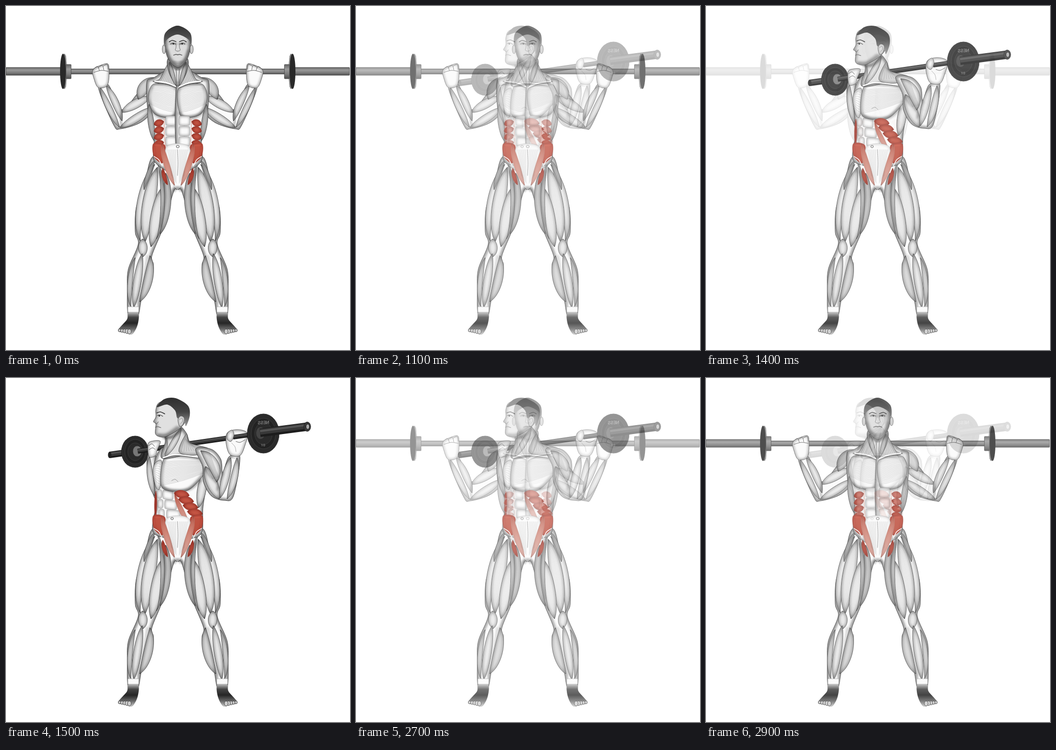
An HTML page that plays this animation: 700 px wide and 700 px high, repeating every 3000 ms.

```html
<!DOCTYPE html>
<html lang="en">
<head>
<meta charset="utf-8">
<title>Standing barbell twist</title>
<style>
html, body { margin: 0; width: 100%; height: 100%; overflow: hidden; background: #fff; }
svg { display: block; width: 100%; height: 100%; }
</style>
</head>
<body>
<svg id="stage" viewBox="0 0 700 700"></svg>
<script>
let ids = 0;
const loop = (n, f) => Array.from({ length: n }, (_, i) => f(i)).join('');

// Smooth path through a few key points
function curve(pts, closed = true) {
  const v = pts.split(' ').map(Number), n = v.length / 2, k = 0.16;
  const at = i => {
    i = closed ? (i + n) % n : Math.max(0, Math.min(n - 1, i));
    return [v[2 * i], v[2 * i + 1]];
  };
  const ctl = (p, a, b, s) => [0, 1].map(j => (p[j] + s * (b[j] - a[j])).toFixed(1));
  let d = 'M' + at(0);
  for (let i = 0; i < (closed ? n : n - 1); i++) {
    const [a, b, c, e] = [at(i - 1), at(i), at(i + 1), at(i + 2)];
    d += `C${ctl(b, a, c, k)} ${ctl(c, b, e, -k)} ${c}`;
  }
  return closed ? d + 'Z' : d;
}

// Closed shape with soft inner shading and an ink outline
function form(d, { fill = '#fafafa', edge = '#444', w = 6, shade = 0.4, ink = '#444', iw = 0.8 } = {}) {
  const id = 'c' + ids++;
  return `<clipPath id="${id}"><path d="${d}"/></clipPath>
    <g clip-path="url(#${id})"><path d="${d}" fill="${fill}"/>
    <path d="${d}" fill="none" stroke="${edge}" stroke-width="${w}" opacity="${shade}" filter="url(#blur)"/></g>
    <path d="${d}" fill="none" stroke="${ink}" stroke-width="${iw}"/>`;
}
const thin = (d, color = '#333', op = 0.4) => `<path d="${d}" fill="none" stroke="${color}" stroke-width=".55" opacity="${op}"/>`;

// Spindle-shaped muscle between two tendons, with fibres along it
function belly(x1, y1, x2, y2, r, bend = 0, look = {}) {
  const dx = x2 - x1, dy = y2 - y1, len = Math.hypot(dx, dy);
  const p = (t, o) => `${(x1 + dx * t - dy / len * o * 4 / 3).toFixed(1)} ${(y1 + dy * t + dx / len * o * 4 / 3).toFixed(1)}`;
  const strand = o => `M${x1} ${y1}C${p(0.2, o)} ${p(0.8, o)} ${x2} ${y2}`;
  const n = Math.round(r * 0.9);
  return form(`${strand(bend + r)}C${p(0.8, bend - r)} ${p(0.2, bend - r)} ${x1} ${y1}Z`, look)
    + thin(loop(n, i => strand(bend + r * (2 * (i + 0.5) / n - 1))), look.fibre);
}

// Fibres from the segment a-b gathering towards the segment c-d
const fan = (a, b, c, d, n, color, op) => thin(loop(n, i => {
  const u = (i + 0.5) / n, mix = (p, q) => [0, 1].map(j => p[j] + (q[j] - p[j]) * u);
  const s = mix(a, b), e = mix(c, d);
  return `M${s}Q${(s[0] + e[0]) / 2} ${(s[1] + e[1]) / 2 + 12 * (u - 0.5)} ${e}`;
}), color, op);

const body = (pts, look) => form(curve(pts), { w: 9, shade: 0.6, ink: '#2c2c2c', ...look });
const flat = (pts, fill) => `<path d="${curve(pts)}" fill="${fill}"/>`;
const line = (pts, w = 0.8, color = '#333', more = '') =>
  `<path d="${curve(pts, false)}" fill="none" stroke="${color}" stroke-width="${w}" stroke-linecap="round" ${more}/>`;
const soft = (pts, w = 6, op = 0.45) => line(pts, w, '#333', `opacity="${op}" filter="url(#blur)"`);
const oval = (x, y, rx, ry, fill, ink = 'none') =>
  `<ellipse cx="${x}" cy="${y}" rx="${rx}" ry="${ry}" fill="${fill}" stroke="${ink}"/>`;
const rect = (x, y, w, h, fill, ink = '#444') =>
  `<rect x="${x}" y="${y}" width="${w}" height="${h}" rx="1" fill="${fill}" stroke="${ink}" stroke-width=".8"/>`;
const pad = (x, y, w, h, slant = 0) =>
  form(curve([x + 3, y, x + w - 3, y + slant, x + w, y + 3 + slant, x + w, y + h - 3 + slant,
    x + w - 3, y + h + slant, x + 3, y + h, x, y + h - 3, x, y + 3].join(' ')), { w: 4, ink: '#888', iw: 0.6 });
const both = s => {
  const id = 'm' + ids++;
  return `<g id="${id}">${s}</g><use href="#${id}" transform="matrix(-1 0 0 1 699 0)"/>`;
};

const DIM = { fill: '#d2d2d2' };
const RED = { fill: '#cd5c4a', edge: '#84241a', w: 5, shade: 0.6, ink: '#a04436', iw: 0.6, fibre: '#6d170e' };
const BAND = { ...RED, fill: 'url(#band)', edge: '#b8604f', w: 3, shade: 0.35, ink: '#c08a7e' };

const leg = [
  body('300 306 282 364 265 410 263 460 269 485 249 535 247 575 249 630 268 632 277 592 297 552 300 526 297 508 320 450 341 378 349 372 349 340'),
  belly(325, 340, 314, 464, 9, -7, DIM),
  belly(303, 322, 273, 478, 8, 13),
  belly(308, 328, 283, 480, 13, 5),
  belly(315, 372, 295, 490, 12, -1),
  belly(306, 312, 306, 474, 4, -13),
  belly(304, 312, 281, 374, 4, 3, DIM),
  soft('312 335 324 385 315 450', 4, 0.4),
  belly(278, 474, 279, 510, 9),
  belly(293, 508, 272, 602, 9, -7, { fill: '#e4e4e4' }),
  belly(263, 512, 254, 612, 5, 6),
  belly(277, 504, 260, 614, 8, 1),
  soft('288 508 281 550 267 606', 2, 0.5),
  flat('249 624 246 638 228 660 243 665 257 668 268 648 269 624', 'url(#foot)'),
  loop(5, i => oval(231 + 5 * i, 660 + i * 0.6, 2.6 + i * 0.3, 3 + i * 0.5, '#ccc', '#444')),
  rect(248, 612, 22, 11, '#fafafa', '#aaa'),
].join('');

const hips = both(
  form(curve('300 280 323 283 322 308 317 320 301 306'), RED)
  + fan([301, 284], [322, 286], [304, 306], [320, 316], 10, '#6d170e', 0.5)
  + line('301 306 311 313 318 326', 1.5, '#fff'))
  + form(curve('326 287 373 287 366 345 349 373 333 345'), { w: 3, shade: 0.25, ink: '#aaa', iw: 0.5 })
  + both(belly(317, 280, 343, 365, 6, 3, BAND) + belly(319, 330, 329, 364, 4, 2, RED)
    + fan([328, 292], [347, 292], [336, 345], [347, 362], 7, '#444', 0.35))
  + line('349 292 350 320 349 345', 0.8, '#777') + soft('342 376 349 369 357 376', 4, 0.5);

const weight = [
  rect(0, 125, 112, 16, 'url(#steel)'), rect(130, 128, 225, 10.5, 'url(#steel)'),
  oval(119, 133, 5, 36, '#777'), oval(116, 133, 6, 36, '#292929'),
  line('121.5 102 123 133 121.5 164', 1.8, '#999', 'stroke-dasharray="1 1"'),
  rect(122, 119, 10.5, 29, 'url(#steel)'),
].join('');

const arm = [
  body('270 176 236 211 208 160 188 166 219 242 233 250 274 237 297 212 294 172'),
  belly(294, 184, 235, 216, 9, 1), belly(296, 206, 232, 247, 8, -2),
  belly(192, 166, 231, 247, 6, 2), belly(204, 162, 236, 234, 7, -3),
  soft('236 214 233 232 236 244', 3, 0.5),
  belly(308, 147, 269, 190, 12, 7, { fill: '#dedede' }),
  form(curve('177 130 197 119 209 121 207 160 188 166 179 148')),
  loop(3, i => line(`${178 + 10 * i} ${128 - 3 * i} ${186 + 10 * i} ${123 - i * 2} ${190 + 9 * i} ${131 - i}`)),
  line('179 135 194 131 208 133'), line('188 167 198 164 207 159', 0.8, '#aaa'),
].join('');

const chest = [
  body('349 140 298 147 286 158 289 215 301 272 303 318 349 325', { fill: '#f2f2f2' }),
  belly(291, 200, 301, 274, 6, 1, DIM),
  form(curve('330 117 313 148 300 154 348 163 340 120'), DIM),
  fan([328, 128], [342, 128], [308, 154], [342, 162], 9),
  form(curve('348 168 306 158 293 168 290 192 303 220 332 227 346 218'), { w: 8, shade: 0.5 }),
  fan([346, 170], [346, 218], [297, 166], [293, 200], 18),
  soft('296 214 314 226 334 227 347 218', 4, 0.5),
  line('303 153 326 156 346 164', 2.5, '#fff'), line('303 156 326 159 346 167'),
  loop(3, i => pad(325, 224 + 21 * i, 22, 19)),
  line('322 230 322 260 325 290', 2, '#e4bdb4'),
  loop(4, i => belly(301, 241 + 14 * i, 321, 235 + 14 * i, 7, 0, RED)),
].join('');

const headFront = [
  body('331 106 331 133 345 160 354 160 368 133 368 106', { fill: '#dedede' }),
  both(belly(333, 114, 346, 162, 4, 1) + line('346 128 347 142 348 156')),
  soft('334 117 349 127 365 117', 7, 0.7),
  both(oval(321.5, 88, 3.5, 9, '#ccc', '#666')),
  body('350 44 326 62 326 95 336 116 350 125 363 116 373 95 373 62', { fill: '#dcdcdc' }),
  both([
    soft('328 92 334 108 346 119', 7, 0.3), soft('334 77 340 75 346 78', 3, 0.5),
    line('332 73 338 70 346 72.5', 1.6), line('335 77.5 340 75.5 345 77.5', 1.1), oval(340.5, 77, 1.7, 1.4, '#222'),
    line('346 76 346 84 344.5 90 349.5 92', 0.9, '#666'), line('341 100 346 98.5 350 99.5', 1.3, '#555'),
  ].join('')),
  soft('342 113 350 116 357 113', 5, 0.25),
  flat('322 82 324 55 349 40 375 55 377 82 371 68 349 58 328 68', 'url(#crop)'),
].join('');

const front = both(weight) + '<use href="#legs"/>' + both(arm) + both(chest) + headFront
  + '<use href="#hips"/>' + oval(349.5, 286, 3, 2.6, '#eee', '#555');

const rod = (x1, y1, x2, y2, w) => [[0, w, '#1c1c1c'], [-0.1, 0.65 * w, '#383838'], [-0.2, 0.22 * w, '#555']].map(([dy, sw, c]) =>
  `<path d="M${x1} ${y1 + dy * w}L${x2} ${y2 + dy * w}" stroke="${c}" stroke-width="${sw}"/>`).join('');
const disc = (x, y, rx, ry) => oval(x - 1.5, y, rx, ry, '#111')
  + loop(3, i => oval(x, y, rx * (1 - 0.22 * i), ry * (1 - 0.22 * i), i % 2 ? '#222' : '#2a2a2a', '#3c3c3c'));

const bar = rod(211, 156.5, 250, 151, 13) + oval(211, 156.5, 3.5, 6.5, '#222') + disc(263, 150, 27, 32)
  + rod(268, 149, 494, 116, 10) + oval(267, 149, 9, 11, '#777', '#333') + rod(268, 149, 300, 144, 10);

const farArm = [
  body('289 155 288 190 304 246 307 180 302 152', { fill: '#eee' }),
  belly(292, 160, 303, 240, 6, 4),
  form(curve('289 134 300 128 314 129 308 146 304 158 291 160')),
  loop(2, i => line(`${290 + i} ${138 + 8 * i} ${297 + i} ${134 + 8 * i} ${302 + i} ${139 + 6 * i}`)),
].join('');

const torso = [
  body('322 140 302 172 302 225 305 262 299 290 303 318 349 328 396 318 401 262 412 168 380 139'),
  belly(405, 188, 392, 264, 9, 0),
  loop(3, i => pad(308 + i * 1.5, 227 + 20 * i, 9 + i, 18) + pad(319 + 4 * i, 228 + 20 * i, 21 + 3 * i, 18, 2)),
  form(curve('317 170 303 174 299 195 306 224 314 221')),
  fan([315, 174], [313, 218], [303, 176], [300, 204], 9),
  form(curve('320 167 345 157 395 164 408 186 376 225 345 231 316 220'), { w: 9, shade: 0.5 }),
  fan([321, 170], [319, 219], [400, 170], [402, 194], 19),
  line('337 209 344 206 350 211', 0.8, '#888'),
  soft('317 222 340 231 374 226 396 208', 4, 0.5),
  belly(343, 236, 374, 300, 5, 2, BAND),
  loop(4, i => belly(342 + 9 * i, 234 + 12.5 * i, 373 + 9 * i, 239 + 12.5 * i, 8, 0, RED)),
  belly(305, 230, 304, 284, 2.5, 0, RED),
].join('');

const headSide = [
  body('324 108 324 130 317 163 365 156 392 142 374 130 367 112 352 98', { fill: '#e2e2e2' }),
  form(curve('367 114 374 132 412 144 385 157 352 150'), DIM),
  fan([364, 122], [372, 130], [354, 150], [402, 147], 9),
  belly(356, 102, 323, 160, 6, -2),
  line('327 122 328 140 322 156'), line('320 162 345 156 390 161', 2.5, '#fff'), line('320 165 345 158 390 163'),
  soft('322 121 338 120 356 105', 6, 0.6),
  body('312 50 305 64 305 79 300 89 305 93 304 113 312 119 326 119 352 104 366 86 366 64 340 44', { fill: '#e0e0e0', w: 7, shade: 0.45 }),
  soft('312 116 328 115 348 101', 7, 0.35),
  line('307 71 314 69 323 73', 1.6), line('308 76.5 313 75 319 78', 1.1), oval(312, 77, 1.6, 1.5, '#222'),
  line('303 92 307 93 310 89', 1, '#555'), line('304 100 309 99 315 101', 1.2, '#555'),
  flat('307 59 322 43 345 41 370 56 374 76 366 98 362 80 349 82 344 66 328 54', 'url(#fade)'),
  form(curve('350 84 356 77 363 82 360 95 353 98'), { w: 3, fill: '#e2e2e2' }),
  line('353 85 358 82 359 88 355 93', 0.7, '#666'),
].join('');

const nearArm = [
  body('386 144 418 145 437 165 441 192 454 160 476 160 463 240 444 249 418 240 402 212 400 180'),
  belly(406, 180, 434, 246, 11, 1),
  belly(396, 148, 429, 212, 11, -10),
  fan([388, 150], [414, 147], [420, 206], [434, 202], 12),
  belly(457, 162, 436, 244, 8, 0), belly(470, 162, 450, 246, 7, -4),
  soft('404 184 414 198 428 212', 4, 0.4), soft('441 194 434 210 430 228', 3, 0.5),
  form(curve('450 112 470 105 491 112 486 138 476 158 456 156 448 134')),
  rod(462, 120.5, 494, 116, 9),
  form(curve('451 112 460 106 464 116 458 129 450 124')),
  line('468 129 476 131 486 126'), line('459 132 466 140 468 150', 0.7, '#888'),
  line('454 160 465 163 475 160', 0.8, '#aaa'),
].join('');

const nearPlate = [
  disc(524, 113, 32, 40),
  '<g font-family="Roboto, sans-serif" font-weight="700" fill="#777" text-anchor="middle">',
  '<text transform="matrix(-1 .05 0 1 524 94)" font-size="9.5">NESS</text><text x="523" y="139" font-size="8">10</text></g>',
  oval(518, 112, 9, 12, '#444'), rod(517, 111.5, 613, 99, 17),
  oval(613, 99, 7, 9.5, '#3a3a3a', '#222'), oval(614, 99, 3.6, 5.2, '#aaa', '#111'),
].join('');

const turned = bar + '<use href="#legs"/>' + farArm + torso + headSide + nearArm
  + '<use href="#hips"/>' + oval(338, 286, 2.6, 2.4, '#eee', '#555') + nearPlate;

const grad = (id, ...colors) => `<linearGradient id="${id}" x2="0" y2="1">${colors.map((c, i) =>
  `<stop offset="${i / (colors.length - 1)}" stop-color="${c}"/>`).join('')}</linearGradient>`;

document.getElementById('stage').innerHTML = `<defs>
  <filter id="blur" x="-.5" y="-.5" width="2" height="2"><feGaussianBlur stdDeviation="2.2"/></filter>
  ${grad('steel', '#666', '#999', '#7c7c7c', '#505050')}
  ${grad('crop', '#333', '#4a4a4a', '#777')}
  ${grad('fade', '#2e2e2e', '#444', '#999')}
  ${grad('foot', '#ccc', '#444', '#262626', '#666', '#ccc')}
  ${grad('band', '#cf6f5e', '#dc9a8c', '#e6bdb4')}
  <g id="legs">${both(leg)}</g><g id="hips">${hips}</g></defs>
  <g id="front">${front}</g><g id="turned">${turned}</g>`;

// The two poses cross-fade in six even steps
const LOOP = 3000, STEP = 100, STEPS = 6;
const poseA = document.getElementById('front'), poseB = document.getElementById('turned');
const ramp = t => Math.max(0, Math.min(1, (Math.floor(t / STEP) + 1) / STEPS));
let shown = -1;

function draw(t) {
  const mix = t < 2500 ? ramp(t - 1000) : 1 - ramp(t - 2500);
  if (mix === shown) return;
  shown = mix;
  poseA.setAttribute('opacity', 1 - mix);
  poseB.setAttribute('opacity', mix);
}

const start = performance.now();
function tick() {
  draw((performance.now() - start) % LOOP);
  requestAnimationFrame(tick);
}
tick();
</script>
</body>
</html>
```
